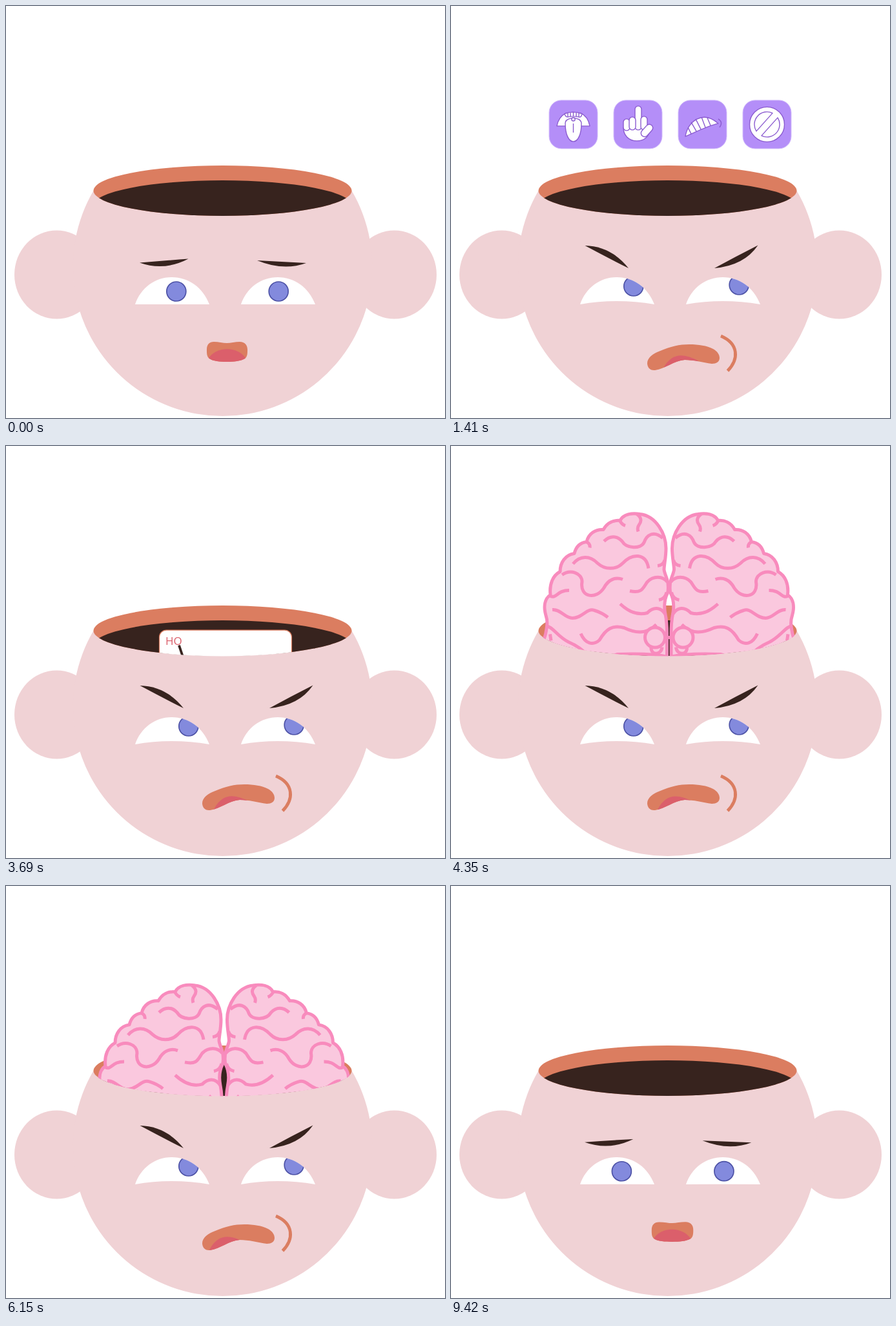
Write an HTML page that moves like this. It is 680 px wide and 638 px high and loops after 9.45 s.

```html
<!DOCTYPE html>
<html lang="pl">
<head>
<meta charset="utf-8">
<title>pogarda</title>
<style>
  html, body { margin: 0; width: 100%; height: 100%; overflow: hidden; background: #fff; }
  svg { display: block; }
  .skin { fill: #f0d2d5; }
  .rim { fill: #db7d60; }
  .dark { fill: #37231e; }
  .pupil { fill: #838add; stroke: #4d52a6; stroke-width: 1.7; }
  .icon { fill: #fff; stroke: #8b5cd0; stroke-width: 1.4; stroke-linejoin: round; }
  .tile { fill: #b48ef8; stroke: #d3bdfb; stroke-width: 1; }
  .bond { fill: none; stroke: #37231e; stroke-width: 3.8; }
  .atom { fill: #db5f6b; font: 17px "Open Sans", "Noto Sans", sans-serif; }
  .atom .sub { font-size: 10px; }
  .brain { fill: #fac8de; stroke: #f88bbd; stroke-width: 5; stroke-linejoin: round; }
  .fold { fill: none; }
  .bubble { fill: #fff; stroke: #5a7bc0; stroke-width: 1.1; }
  .word { fill: #7548c2; font: 700 48px Inter, sans-serif; font-feature-settings: "cv11"; text-anchor: middle; }
</style>
</head>
<body>
<svg width="680" height="638" viewBox="0 0 680 638">
  <defs>
    <clipPath id="opening"><path d="M0,-50H680V286H536A200.5,39.500 0 0 1 135,286H0Z"/></clipPath>
    <clipPath id="hole"><ellipse cx="335.500" cy="286" rx="200" ry="39"/></clipPath>
    <clipPath id="eyeL"><path id="lidL"/></clipPath>
    <clipPath id="eyeR"><path id="lidR"/></clipPath>
    <clipPath id="lipsClip"><path id="lipsEdge"/></clipPath>
    <g id="half">
      <path d="M293,107C318,110 333,138 333,160C333,174 330,186 330,193C331,200 335,206 336,214C336.500,220 337,224 335.500,229C330,240 330,252 332,262C334,272 334.500,282 334.500,292V328C320,324 290,323 258,324C230,330 215,350 185,349C155,346 137,336 139,318C141,306 146,298 147,290C149,280 150,273 147,264C143,250 145,238 154,232C152,215 158,202 169,196C169,182 177,170 191,168C194,156 201,151 210,150C213,137 224,130 236,131C242,120 252,116 262,117C267,107 280,105 293,107Z"/>
      <path class="fold" d="M261,116Q264,123 270,125M288,107C296,113 295,119 291,124Q288,128 290,134
        M237,149C246,140 257,140 265,149C272,161 294,161 299,151C303,139 314,132 328,144
        M210,150Q216,153 215,159M189,184C200,171 215,171 227,183C238,193 255,194 266,183C280,168 302,166 306,191
        M172,201C185,192 203,198 203,212C199,236 225,240 237,221C244,208 255,204 266,208
        M154,234C164,238 164,225 183,225M277,226C296,230 297,222 304,212C314,202 328,203 335,212
        M157,255C170,254 176,268 188,268C204,268 210,252 222,256Q235,260 243,267
        M262,246C275,258 290,264 304,260C313,251 324,250 332,262
        M201,292C208,308 220,311 230,302C240,285 250,278 268,283C285,291 302,294 318,278
        M147,280C158,281 164,296 182,305C196,311 206,318 214,329
        M320,187Q329,186 331,178M322,240Q332,238 334,228M153.500,293L155,303"/>
      <path d="M310,313C309,326 326,326 327,313"/>
      <circle cx="316" cy="298" r="15.500"/>
      <path class="fold" d="M331,298H338"/>
    </g>
  </defs>

  <ellipse class="skin" cx="78.500" cy="416" rx="65.500" ry="68.500"/>
  <ellipse class="skin" cx="601.500" cy="416" rx="65.500" ry="68.500"/>
  <path class="skin" d="M135.500,286A231.800,231.800 0 1 0 535.500,286Z"/>
  <ellipse class="rim" cx="335.500" cy="286" rx="200" ry="39"/>
  <ellipse class="dark" cx="335.500" cy="309" rx="200" ry="39" clip-path="url(#hole)"/>

  <g clip-path="url(#opening)">
    <g id="icons">
      <g transform="translate(152)">
        <rect class="tile" width="75" height="75" rx="19"/>
        <g class="icon">
          <path d="M12,40C14,29 20,23 26,20Q37,17 49,20C56,23 61,30 63,40H48V32Q37.500,25 26,32V40Z"/>
          <path d="M24,21Q37,16 51,21Q50,27 46,26Q37.500,24 29,26Q25,26 24,21ZM29,20V26M33,19V25M37.500,19V25M42,19V25M46,20V26"/>
          <path d="M25,36C25,25 50,25 50,36C50,52 45,64 37.500,64C30,64 25,52 25,36ZM37.500,36V50"/>
          <circle cx="37.500" cy="29.500" r="2.600"/>
        </g>
      </g>
      <g transform="translate(252)">
        <rect class="tile" width="75" height="75" rx="19"/>
        <g class="icon">
          <path d="M15,42C15,54 23,63 36,63C48,63 55,56 56,45L52,38H20Z"/>
          <rect x="33" y="9" width="10" height="37" rx="5"/>
          <rect x="15" y="29" width="10" height="18" rx="5"/>
          <rect x="24" y="26" width="10" height="20" rx="5"/>
          <rect x="42" y="25" width="10" height="21" rx="5"/>
          <rect x="46" y="36" width="11" height="22" rx="5.500" transform="rotate(42 51.500 47)"/>
        </g>
      </g>
      <g transform="translate(352)">
        <rect class="tile" width="75" height="75" rx="19"/>
        <g class="icon">
          <path d="M11,56C15,32 38,15 62,36C45,40 28,49 11,56ZM15,42L20,52M20,34L28,48M27,29L35,45M36,26L42,42M45,27L50,39"/>
          <path fill="none" d="M62,29Q70,34 64,42"/>
        </g>
      </g>
      <g transform="translate(452)">
        <rect class="tile" width="75" height="75" rx="19"/>
        <g class="icon">
          <circle cx="37.500" cy="37.500" r="27"/>
          <path d="M46,20A19.500,19.500 0 0 0 21,48ZM54,27A19.500,19.500 0 0 1 29,55Z"/>
        </g>
      </g>
    </g>

    <g id="card">
      <g transform="translate(0 -182)">
        <rect x="237.500" y="182.500" width="205" height="156" rx="11" fill="#fff" stroke="#db7d60" stroke-width="1.200"/>
        <path class="skin" d="M274,223L303,229L312,258L338.500,270L336,299L306,305L292,280L264,274L254,246Z"/>
        <path class="bond" d="M268,206L274,224M276,231L262,247M298,235L305,257M268,268.500L290,273.500M332.500,273L330.500,295M338,271L364,256L388,269.500L405.500,259"/>
        <g class="atom">
          <text x="247" y="205">HO</text>
          <text x="300.500" y="312">N</text>
          <text x="300.500" y="325">H</text>
          <text x="406" y="261">NH</text>
          <text class="sub" x="430" y="267">2</text>
        </g>
      </g>
    </g>

    <g id="brain" class="brain">
      <g transform="translate(0 -105)">
        <use href="#half"/>
        <use href="#half" transform="translate(675.500) scale(-1 1)"/>
      </g>
    </g>
  </g>

  <path id="bubble" class="bubble" d="M228,37H451Q463.500,37 463.500,49V121Q463.500,133 451,133H253.500Q254,147 259.500,160Q245,149 240.500,133H228Q215.500,133 215.500,121V49Q215.500,37 228,37Z"/>
  <text id="word" class="word" x="340" y="102">pogarda</text>

  <g fill="#fff"><path id="whiteL"/><path id="whiteR"/></g>
  <g clip-path="url(#eyeL)"><circle id="pupilL" class="pupil" r="15"/></g>
  <g clip-path="url(#eyeR)"><circle id="pupilR" class="pupil" r="15"/></g>
  <path id="browL" class="dark"/>
  <path id="browR" class="dark"/>
  <path id="lips" class="rim"/>
  <path id="tongue" fill="#db5f6b" clip-path="url(#lipsClip)"/>
  <path id="crease" d="M418,511C446,523 446,547 428.500,565" fill="none" stroke="#db7d60" stroke-width="4.800"/>
</svg>
<script>
const LOOP = 9450, MORPH = 950;
const el = id => document.getElementById(id);
const set = (id, attrs) => { for (const a in attrs) el(id).setAttribute(a, attrs[a]); };
const clamp = v => Math.max(0, Math.min(1, v));
const ramp = (t, from, to) => clamp((t - from) / (to - from));
const ease = u => (1 - Math.cos(Math.PI * u)) / 2;

// Blends two paths that share the same commands.
function blend(a, b, k) {
  const goal = b.match(/-?[\d.]+/g);
  let i = 0;
  return a.replace(/-?[\d.]+/g, n => (+n + (goal[i++] - n) * k).toFixed(2));
}

// Eased height through [time, y] stops.
function along(stops, t) {
  let y = stops[0][1];
  for (let i = 1; i < stops.length; i++) {
    const [t0, y0] = stops[i - 1], [t1, y1] = stops[i];
    if (t >= t0) y = y0 + (y1 - y0) * ease(ramp(t, t0, t1));
  }
  return y;
}

const tracks = {
  icons: [[0, 334], [930, 58], [2190, 334]],
  card: [[1980, 340], [2720, 9], [3285, 9], [3840, 340]],
  brain: [[3885, 334], [4520, 58], [5820, 58], [6655, 334]]
};

// Each pair holds the calm and the scornful shape.
const brows = {
  browL: ["M207,397.5Q245,394.5 282.5,391.5Q245,411 207,397.5Z", "M207.5,371Q248,372 275,406Q241,389 207.5,371Z"],
  browR: ["M389,394Q427,396 465,398Q430,411 389,394Z", "M408,406Q441,388 475.5,370.5Q454,402 408,406Z"]
};
const lips = [
  "M311,532C311,524 315,520 322,520C329,520 336,522 342,522C348,522 355,520 362,520C370,520 374,525 374,532C374,538 374,543 370,546C364,550 352,551 342,551C332,551 320,550 315,546C311,543 311,538 311,532Z",
  "M304,553C304,545 313,538 323,534.5C340,527 354,524 369,524C384,524 396,526 406,531C413,535 416,540 416,545C416,551 411,554 404,554C390,552 376,548 362,548C345,549 332,562 316,564C308,565 304,559 304,553Z"
];

function drawFace(t) {
  const k = t < 8000 ? clamp(t / MORPH) : clamp((LOOP - t) / MORPH);
  const drift = ramp(t, MORPH, 7950), dx = -20 * drift, dy = 3 * drift;
  const lid = x => `M${200 + x},462C${209 + x},436 ${231 + x},420 ${257 + x},420S${305 + x},436 ${315 + x},462Q${257 + x},${462 - 10 * k} ${200 + x},462Z`;
  for (const [side, x] of [["L", 0], ["R", 164]]) {
    set("lid" + side, { d: lid(x) });
    set("white" + side, { d: lid(x) });
  }
  set("pupilL", { cx: 263.8 + 19 * k, cy: 442 - 8 * k });
  set("pupilR", { cx: 422.2 + 24 * k, cy: 442 - 10 * k });
  for (const id in brows) set(id, { d: blend(...brows[id], k) });

  const mouth = blend(...lips, k);
  set("lips", { d: mouth });
  set("lipsEdge", { d: mouth });
  const scorn = `M${330 + dx},${561 + dy}C${343 + dx},${537 + dy} ${360 + dx},${537 + dy} ${384 + dx},${549 + dy}L${384 + dx},570L${330 + dx},570Z`;
  set("tongue", { d: blend("M313,547C324,526 361,526 372,547L372,560L313,560Z", scorn, k) });
  set("crease", { opacity: clamp(2 * k - 1) });
}

function frame() {
  const t = performance.now() % LOOP;
  for (const id in tracks) set(id, { transform: `translate(0 ${along(tracks[id], t)})` });
  const out = 1 - ramp(t, 8140, 8420);
  set("bubble", { opacity: Math.min(ramp(t, 6480, 6750), out) });
  set("word", { opacity: Math.min(ramp(t, 6560, 6840), out) });
  drawFace(t);
  requestAnimationFrame(frame);
}
frame();
</script>
</body>
</html>
```
